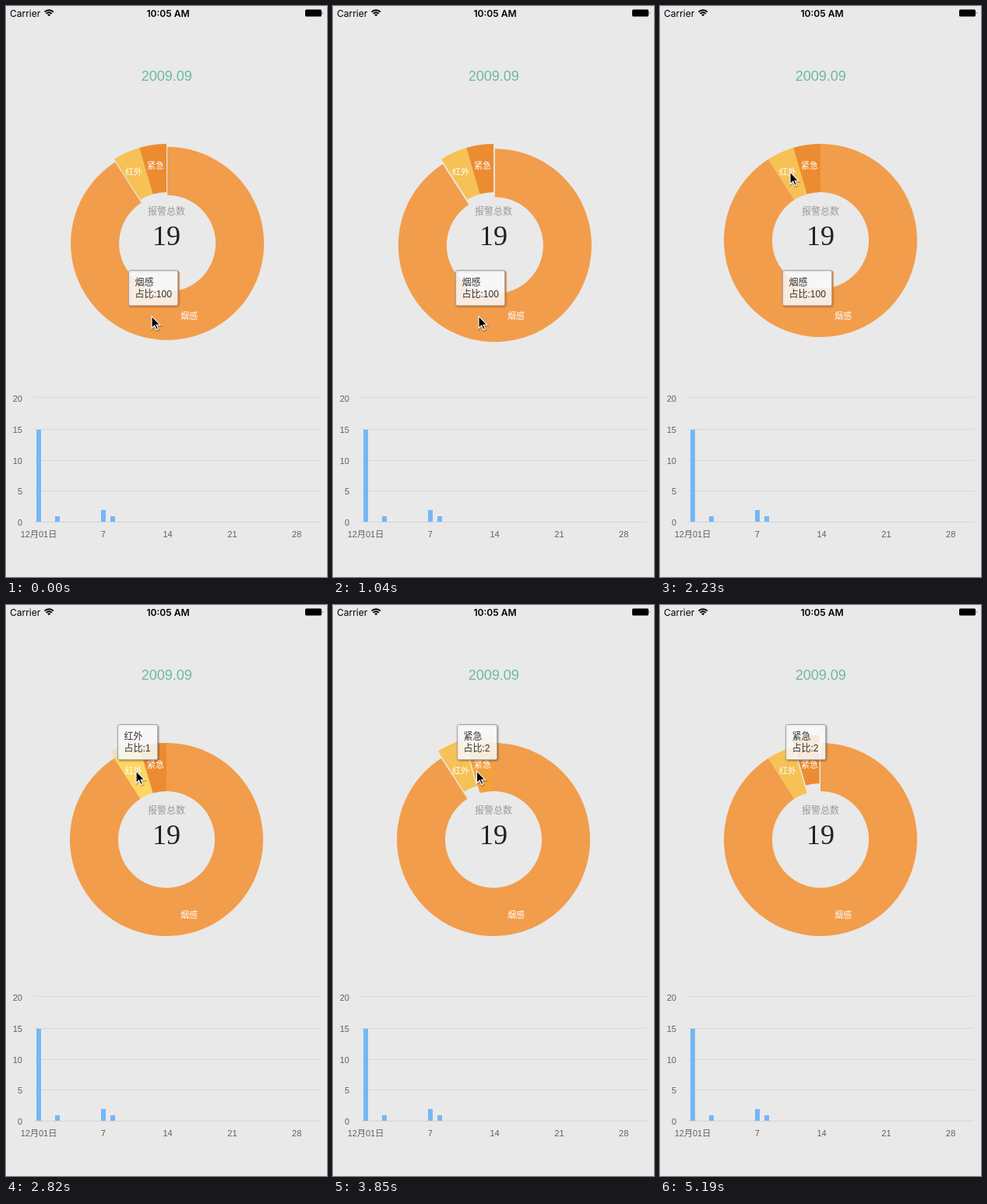
An HTML page that plays this animation: 412x733 px, repeating every 5630 ms.

```html
<!DOCTYPE html>
<html lang="zh">
<head>
<meta charset="utf-8">
<title>报警总数</title>
<style>
  html, body { margin: 0; width: 100%; height: 100%; overflow: hidden; background: #e9e9e9; }
  svg { display: block; width: 412px; height: 733px; }
  text { font-family: "Liberation Sans", "Noto Sans CJK SC", "Noto Sans CJK", sans-serif; }
  .bar { font: 12px Inter, sans-serif; }
  .axis text { font-size: 11px; fill: #606060; }
  .labels text { font-size: 11px; fill: #fff; text-anchor: middle; }
  .mid { text-anchor: middle; }
  .end { text-anchor: end; }
  #tip text { font-size: 12px; fill: #333; }
  #tip rect { fill: none; }
</style>
</head>
<body>
<svg viewBox="0 0 412 733">
  <rect width="412" height="733" fill="#e9e9e9"/>

  <text class="bar" x="5" y="14">Carrier</text>
  <g fill="none" stroke="#000" stroke-width="1.9">
    <path d="M49.5 7.6a8 8 0 0 1 11.4 0M51.6 9.8a5 5 0 0 1 7.2 0"/>
    <path d="M55.2 13.2l-2-2a2.8 2.8 0 0 1 4 0z" fill="#000" stroke="none"/>
  </g>
  <text class="bar mid" x="208" y="14" style="font-weight:600">10:05 AM</text>
  <rect x="384" y="4.5" width="21" height="9" rx="1.5"/>
  <path d="M405.8 7.2q1.6 1.8 0 3.6z"/>

  <text class="mid" x="206.3" y="95.5" font-size="18" fill="#6cbb9d">2009.09</text>

  <g id="pie"></g>
  <g class="labels">
    <text x="235" y="402">烟感</text>
    <text x="164" y="217">红外</text>
    <text x="192" y="209">紧急</text>
  </g>
  <text class="mid" x="206" y="268" font-size="12" fill="#999">报警总数</text>
  <text class="mid" x="206" y="307" font-size="36" fill="#222"
    style="font-family:'Liberation Serif',serif">19</text>

  <g id="axis" class="axis"></g>

  <g id="tip">
    <g id="shade" stroke="#000" transform="translate(1 1)">
      <rect rx="3" height="45" stroke-width="5" opacity=".05"/>
      <rect rx="3" height="45" stroke-width="3" opacity=".1"/>
      <rect rx="3" height="45" stroke-width="1" opacity=".15"/>
    </g>
    <rect id="tint" rx="2" height="45" stroke="#dd7a27" stroke-width="1.6" transform="translate(1 1)"/>
    <rect id="box" rx="2" height="45" style="fill:rgba(249,249,249,.85)"/>
    <text id="name" x="8" y="19.7"></text>
    <text id="share" x="8" y="34.7"></text>
  </g>

  <g id="cursor">
    <path d="M0 0V15.5L3.6 12.2L6.1 17.6L8.4 16.6L6 11.3H10.8Z" transform="translate(.8 1.4)"
      fill="none" stroke="#000" stroke-width="2.5" opacity=".16"/>
    <path d="M0 0V15.5L3.6 12.2L6.1 17.6L8.4 16.6L6 11.3H10.8Z" stroke="#fff" stroke-width="1.1"/>
  </g>
</svg>
<script>
const LOOP = 5630;
// The picture is refreshed only at these times (ms).
const TICKS = [0, 150, 300, 600, 890, 1040, 1190, 1340, 1490, 1630, 1780, 1930, 2230,
  2530, 2670, 2820, 2960, 3110, 3250, 3550, 3700, 3850, 4000, 4150, 4300, 4450,
  4750, 4900, 5040, 5190];
const CX = 206, CY = 301, R = 124, HOLE = 62, SLIDE = 10;
const UNIT = Math.PI * 2 / 22;

const $ = id => document.getElementById(id);
function add(parent, tag, attrs, text) {
  const el = document.createElementNS('http://www.w3.org/2000/svg', tag);
  set(el, attrs);
  if (text !== undefined) el.textContent = text;
  return parent.appendChild(el);
}
function set(el, attrs) {
  for (const k in attrs) el.setAttribute(k, attrs[k]);
}

// Ring sector; angles run clockwise from the top.
function sector(a, b, r0, r1) {
  const at = (r, t) => (CX + r * Math.sin(t)).toFixed(2) + ' ' + (CY - r * Math.cos(t)).toFixed(2);
  const big = b - a > Math.PI ? 1 : 0;
  return `M${at(r1, a)}A${r1} ${r1} 0 ${big} 1 ${at(r1, b)}` +
    `L${at(r0, b)}A${r0} ${r0} 0 ${big} 0 ${at(r0, a)}Z`;
}

const slices = [
  { name: '烟感', share: 100, from: 0, to: 20, color: '#f29d4b', hot: '#f29d4b' },
  { name: '红外', share: 1, from: 20, to: 21, color: '#f6c255', hot: '#fdd664' },
  { name: '紧急', share: 2, from: 21, to: 22, color: '#ec8c31', hot: '#f3a13b' }
];
for (const s of slices) {
  const a = s.from * UNIT, b = s.to * UNIT, m = (a + b) / 2;
  s.dx = Math.sin(m) * SLIDE;
  s.dy = -Math.cos(m) * SLIDE;
  s.halo = add($('pie'), 'path', { d: sector(a, b, R, R + 10), fill: s.color, opacity: 0.25 });
  s.el = add($('pie'), 'path', { d: sector(a, b, HOLE, R) });
}

const axis = $('axis');
[502.5, 543.5, 583.5, 622.5, 662.5].forEach((y, i) => {
  add(axis, 'path', { d: `M36 ${y}H403`, stroke: i < 4 ? '#d8d8d8' : '#d2d4d6' });
  add(axis, 'text', { x: 21, y: 508 + i * 39.75, class: 'end' }, 20 - i * 5);
});
['12月01日', 7, 14, 21, 28].forEach((d, i) =>
  add(axis, 'text', { x: 42 + i * 82.8, y: 681.5, class: 'mid' }, d));
[[39, 118], [63, 7], [122, 15], [134, 7]].forEach(([x, h]) =>
  add(axis, 'rect', { x, y: 662 - h, width: 6, height: h, fill: '#74b7f5' }));

// Sine ease over half a second.
function ease(t, start) {
  const p = Math.min(1, Math.max(0, (t - start) / 500));
  return 0.5 - Math.cos(Math.PI * p) / 2;
}

// Cursor stops: time, x, y.
const route = [[0, 187, 398], [1340, 187, 398], [1490, 185, 362], [1630, 181, 288],
  [1780, 177, 230], [1930, 175, 214], [2230, 167, 213], [3250, 167, 213], [3550, 176, 213],
  [3700, 184.5, 213], [4450, 184.5, 213], [4750, 200, 246], [4900, 270, 430], [5040, 359, 676]];
function cursorAt(t) {
  let i = 0;
  while (i < route.length - 2 && route[i + 1][0] <= t) i++;
  const [t0, x0, y0] = route[i], [t1, x1, y1] = route[i + 1];
  const p = Math.min(1, (t - t0) / (t1 - t0));
  return [x0 + (x1 - x0) * p, y0 + (y1 - y0) * p];
}

// Tooltip glides to its new place with a decaying gap.
function glide(t, start, from, to) {
  const n = (t - start) / 32;
  const near = (a, b, k) => Math.floor(b + (a - b) * k ** n + 0.01) + 0.5;
  return [near(from[0], to[0], 2 / 3), near(from[1], to[1], 0.5)];
}
const SPOTS = [[157, 339], [143, 153], [161, 153]];

function draw(t) {
  const out = [
    ease(t, -218) - ease(t, 840),
    ease(t, 2780) - ease(t, 3950),
    ease(t, 3950)
  ];
  const hot = t >= 2530 && t < 2900 ? 1 : t >= 3700 && t < 3950 ? 2 : -1;
  slices.forEach((s, i) => {
    set(s.el, {
      transform: `translate(${s.dx * out[i]} ${s.dy * out[i]})`,
      fill: i === hot ? s.hot : s.color
    });
    s.halo.style.display = i === hot ? '' : 'none';
  });

  const cur = t < 2530 ? 0 : t < 3700 ? 1 : 2;
  const fresh = t >= 600 && t < 890;
  let pos = fresh ? [156.5, 338.5] : [157.5, 339.5];
  if (cur === 1) pos = glide(t, 2500, SPOTS[0], SPOTS[1]);
  if (cur === 2) pos = glide(t, 3670, SPOTS[1], SPOTS[2]);
  set($('tip'), { transform: `translate(${pos})` });
  document.querySelectorAll('#tip rect').forEach(r => set(r, { width: cur ? 51 : 63 }));
  set($('box'), { stroke: fresh ? '#f29d4b' : '#a6a6a6' });
  $('tint').style.display = cur || fresh ? 'none' : '';
  $('name').textContent = slices[cur].name;
  $('share').textContent = '占比:' + slices[cur].share;

  set($('cursor'), { transform: `translate(${cursorAt(t)})` });
  $('cursor').style.display = t < 5190 ? '' : 'none';
}

const start = performance.now();
let last = -1;
function tick() {
  const now = (performance.now() - start) % LOOP;
  const t = TICKS.filter(v => v <= now).pop();
  if (t !== last) draw(last = t);
  requestAnimationFrame(tick);
}
tick();
</script>
</body>
</html>
```
